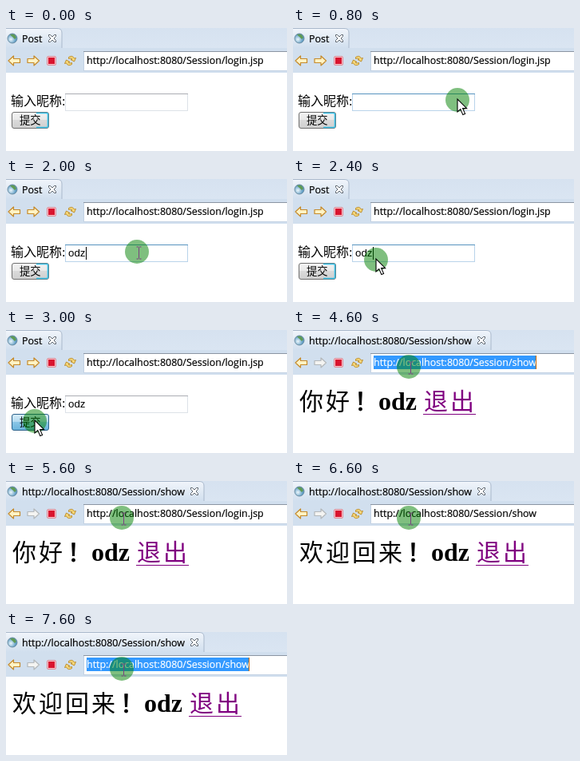
These frames come from a looping animation (352 by 154 pixels, 8000 ms). An HTML page:

```html
<!DOCTYPE html>
<html lang="zh">
<head>
<meta charset="utf-8">
<title>Session login</title>
<style>
html, body { margin: 0; width: 100%; height: 100%; overflow: hidden; background: #fff; }
svg { display: block; width: 352px; height: 154px; }
.ui { font: 12.45px "Open Sans", "Noto Sans", sans-serif; stroke: currentColor; stroke-width: .2px; }
.cjk { font-family: "Liberation Serif", "Noto Sans CJK SC", "Noto Sans CJK", serif; font-size: 16px; }
.field { font: 13.33px "Liberation Sans", sans-serif; }
.btn { font: 13.33px "Noto Sans CJK SC", "Noto Sans CJK", sans-serif; }
.big { font: 30px "Noto Sans CJK SC", "Noto Sans CJK", sans-serif; letter-spacing: 3px; }
.mark { stroke: #000; stroke-width: 1px; }
.bold { font: bold 32px "Liberation Serif", serif; }
.crisp { shape-rendering: crispEdges; }
</style>
</head>
<body>
<svg viewBox="0 0 352 154">
  <defs>
    <linearGradient id="strip" x2="0" y2="1"><stop stop-color="#d6e2f0"/><stop offset="1" stop-color="#dae5f2"/></linearGradient>
    <linearGradient id="tabFill" x2="0" y2="1"><stop stop-color="#f1f5fb"/><stop offset="1" stop-color="#d1dfee"/></linearGradient>
    <linearGradient id="grey" x2="0" y2="1"><stop stop-color="#f3f3f3"/><stop offset=".5" stop-color="#e8e8e8"/><stop offset=".5" stop-color="#dadada"/><stop offset="1" stop-color="#cfcfcf"/></linearGradient>
    <linearGradient id="blue" x2="0" y2="1"><stop stop-color="#d8edf8"/><stop offset=".5" stop-color="#b0d9ef"/><stop offset=".5" stop-color="#8ac6e6"/><stop offset="1" stop-color="#68b3db"/></linearGradient>
    <radialGradient id="sea" cx=".35" cy=".6"><stop stop-color="#eef8fc"/><stop offset="1" stop-color="#5f9cc4"/></radialGradient>
    <path id="turn" d="M78.5 36.5Q83 33.5 85.5 38L87.5 37.5 85.5 42 81 39.5 83 39Q81.5 37 78.5 38.5Z"/>
  </defs>

  <!-- tab strip and toolbar -->
  <rect width="352" height="25" fill="url(#strip)"/>
  <rect y="25" width="352" height="31" fill="#d1dfee"/>
  <path id="tab" fill="url(#tabFill)" stroke="#a9b8cb"/>
  <g transform="translate(8 13)">
    <circle r="6" fill="url(#sea)" stroke="#5f7f93" stroke-width=".8"/>
    <path d="M-3-4.5Q0-6 3-4.5L5-1 3 1 0-2Z" fill="#5f9a55"/>
  </g>
  <text id="title" class="ui" x="20" y="17.5"></text>
  <path id="close" fill="#fff" stroke="#5c646e" d="M-4.5-4.5H-2.5L0-2 2.5-4.5H4.5V-2.5L2 0 4.5 2.5V4.5H2.5L0 2-2.5 4.5H-4.5V2.5L-2 0-4.5-2.5Z"/>
  <g stroke-width="1.2" stroke-linejoin="round">
    <path d="M3 41L9.5 35V38.5H17.5V43.5H9.5V47Z" fill="#fff3c4" stroke="#c58a2b"/>
    <path id="forward" d="M41.5 41L35 35V38.5H27V43.5H35V47Z"/>
  </g>
  <rect x="51.5" y="35.5" width="11" height="11" rx="1.5" fill="#f7c6cd" stroke="#dc8c98"/>
  <rect class="crisp" x="53" y="37" width="8" height="8" fill="#d9142f"/>
  <g fill="#f6d777" stroke="#b98a28" stroke-width=".9" stroke-linejoin="round">
    <use href="#turn"/>
    <use href="#turn" transform="rotate(180 80.5 41)"/>
  </g>
  <g class="crisp">
    <rect x="97.5" y="29.5" width="260" height="24" fill="#fff" stroke="#c3d2e4"/>
    <path d="M97 29.5H352" stroke="#8b95a2"/>
  </g>
  <rect id="mark" x="101" y="32" width="204" height="17" fill="#39f"/>
  <text id="url" class="ui" x="101" y="45"></text>
  <rect id="barCaret" y="32" width="1" height="17"/>

  <rect y="56" width="352" height="98" fill="#fff"/>

  <g id="form">
    <text class="cjk" x="6" y="97">输入昵称:</text>
    <g class="crisp" fill="none">
      <rect id="box" x="74.5" y="82.5" width="153" height="21"/>
      <path id="boxTop" d="M74 82.5H228"/>
    </g>
    <text id="name" class="field" x="78" y="97"></text>
    <rect id="caret" y="85" width="1" height="16"/>
    <rect id="btn" x="7.5" y="105.5" width="46" height="20" rx="2.5"/>
    <path id="glow" d="M38 106.5H51Q52.5 106.5 52.5 108V123Q52.5 124.5 51 124.5H38" fill="none" stroke="#35bfe6" stroke-width="1.6"/>
    <text class="btn" x="17" y="119.5">提交</text>
  </g>

  <g id="page">
    <text id="hello" class="big" x="8" y="99.5"></text>
    <g id="tail">
      <text class="big mark" x="-30" y="99.5">！</text>
      <text class="bold" y="100">odz</text>
      <text class="big" x="57" y="99.5" fill="#800080">退出</text>
      <rect class="crisp" x="56" y="105" width="66" height="1" fill="#800080"/>
    </g>
  </g>

  <g id="pointer">
    <circle r="15" fill="#008000" fill-opacity=".5"/>
    <path id="arrow" d="M0-1V15L3.8 11.6 6.8 18.6 9.6 17.4 6.6 10.6H11.6Z" fill="#fff" stroke="#000" stroke-width="1.1"/>
    <path id="beam" d="M-.5-6H2M3-6H5.5M2.5-5.5V8.5M-.5 9H2M3 9H5.5" fill="none" stroke="#7b3f7f"/>
  </g>
</svg>
<script>
const LOOP = 8000, START = performance.now();
const $ = id => document.getElementById(id);
const set = (id, attrs) => { for (const k in attrs) $(id).setAttribute(k, attrs[k]); };
const show = (id, on) => set(id, { visibility: on ? "inherit" : "hidden" });
const write = (id, s) => { if ($(id).textContent !== s) $(id).textContent = s; };
const within = (t, a, b) => t >= a && t < b;

const SITE = "http://localhost:8080/Session/";
// time, x, y of the pointer
const MOVES = [
  [400, 286, 119], [600, 248, 104], [800, 206, 90], [1000, 164, 91],
  [2200, 148, 93], [2400, 104, 101], [2600, 60, 110], [2800, 36, 114],
  [4000, 90, 74], [4200, 130, 52], [4400, 145, 46]
];
// time, typed letters, caret x
const TYPED = [[0, "", 78], [1200, "o", 85], [1600, "od", 93], [2000, "odz", 100]];
const last = (list, t) => list.filter(e => e[0] <= t).pop();

function draw(now) {
  const t = Math.floor(((now - START) % LOOP + LOOP) % LOOP / 200) * 200;
  const shown = t >= 3200, again = t >= 6200, pressed = t >= 3000;
  const edge = shown ? 248 : 70;

  set("tab", { d: `M-1 25V.5H${edge - 6}Q${edge} .5 ${edge} 6V25` });
  set("close", { transform: `translate(${edge - 12} 13)` });
  set("forward", { fill: shown ? "#f4f4f2" : "#fff3c4", stroke: shown ? "#b4b8bb" : "#c58a2b" });
  write("title", shown ? SITE + "show" : "Post");

  const login = t < 3200 || within(t, 5000, 6200);
  const marked = within(t, 4600, 5000) || t >= 7000;
  const ink = marked ? "#fff" : "#000";
  write("url", SITE + (login ? "login.jsp" : "show"));
  set("url", { fill: ink, color: ink });
  show("mark", marked);
  show("barCaret", within(t, 5000, 5600) || within(t, 6200, 6600) || marked);
  set("barCaret", { x: marked ? 304 : login ? 323 : 101, fill: marked ? "#c60" : "#000" });

  show("form", !shown);
  const [, name, caretX] = last(TYPED, t);
  const lit = within(t, 800, 3000);
  write("name", name);
  set("caret", { x: caretX });
  show("caret", !shown && within(t, 1200, 2800));
  set("box", { stroke: lit ? "#b9d3ea" : "#dde2e8" });
  set("boxTop", { stroke: lit ? "#5794bf" : "#abadb3" });
  set("btn", { fill: pressed ? "url(#blue)" : "url(#grey)", stroke: pressed ? "#2c628b" : "#707070" });
  show("glow", !shown && !pressed);

  show("page", shown);
  write("hello", again ? "欢迎回来" : "你好");
  set("tail", { transform: `translate(${again ? 173 : 107} 0)` });

  const at = last(MOVES, t);
  show("pointer", !!at);
  if (at) {
    const beam = within(t, 1000, 2400) || t >= 4000;
    set("pointer", { transform: `translate(${at[1]} ${at[2]})` });
    show("beam", beam);
    show("arrow", !beam);
  }
  requestAnimationFrame(draw);
}
draw(START);
</script>
</body>
</html>
```
